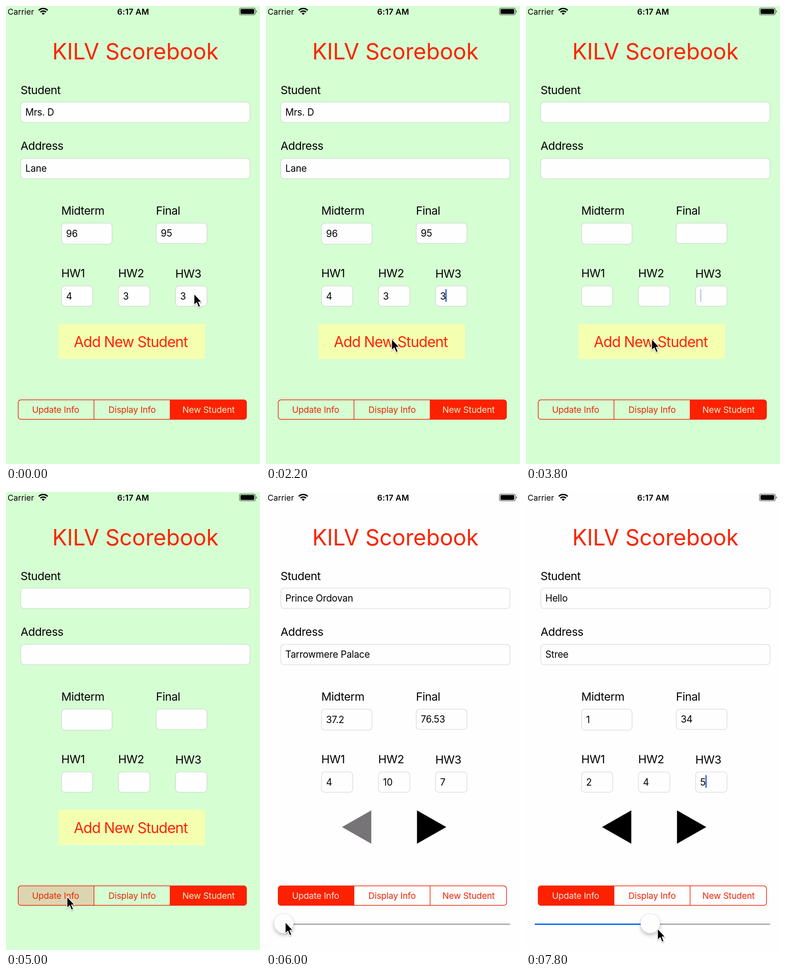
Recreate the animation shown at these times as an HTML page. Size 558 px wide and 1003 px high, loop 8000 ms.

```html
<!DOCTYPE html>
<html lang="en">
<head>
<meta charset="utf-8">
<title>Student form</title>
<style>
  html, body { margin: 0; width: 100%; height: 100%; overflow: hidden; }
  svg { display: block; width: 558px; height: 1003px; }
  text { font-family: Inter, "Liberation Sans", sans-serif; font-optical-sizing: none; }
  .mid { text-anchor: middle; }
  .status { font-size: 17.8px; }
  .label { font-size: 24.9px; letter-spacing: -.02em; }
  .value { font-size: 20.8px; letter-spacing: -.012em; }
  .seg { font-size: 19.2px; letter-spacing: -.01em; }
  .box { fill: #fefefe; stroke: currentColor; stroke-width: 1.1; }
</style>
</head>
<body>
<svg id="stage" viewBox="0 0 558 1003">
  <defs>
    <clipPath id="pill"><rect x="26.5" y="862.5" width="502" height="43" rx="6"/></clipPath>
    <filter id="soft" x="-50%" y="-50%" width="200%" height="200%">
      <feDropShadow dx="0" dy="4" stdDeviation="4" flood-opacity=".25"/>
    </filter>
    <filter id="drop" x="-50%" y="-50%" width="200%" height="200%">
      <feDropShadow dx="0" dy="1.5" stdDeviation="1.2" flood-opacity=".35"/>
    </filter>
  </defs>
  <rect id="back" width="558" height="1003"/>

  <text class="status" x="3.5" y="18.5">Carrier</text>
  <g fill="none" stroke="#000" stroke-width="3">
    <path d="M72 9.6A14 14 0 0 1 91.6 9.6"/>
    <path d="M75.6 13.4A9 9 0 0 1 88 13.4"/>
    <path d="M81.8 19.5L78.5 16.2A4.7 4.7 0 0 1 85.1 16.2Z" fill="#000" stroke="none"/>
  </g>
  <text class="status mid" x="279.3" y="18.5" font-weight="600" letter-spacing=".2">6:17 AM</text>
  <rect x="513" y="4.5" width="34.5" height="15" rx="3.5" fill="none" stroke="#444" stroke-width="1.2"/>
  <rect x="515.2" y="6.5" width="30" height="11" rx="1.8"/>
  <path d="M549.3 9.5q2 .5 2 2.5t-2 2.5z" fill="#555"/>

  <text class="mid" x="284" y="116.5" font-size="49" letter-spacing="-.25" fill="#f92606">KILV Scorebook</text>
  <g id="form"></g>
  <rect id="caret" y="620" width="3" height="28" rx="1" fill="#466ad6"/>

  <g id="add">
    <rect x="115.5" y="696" width="321.5" height="77" fill="#f5ffb0"/>
    <text x="149" y="746.5" font-size="32" letter-spacing="-1" fill="#f92606">Add New Student</text>
  </g>
  <g id="browse">
    <path id="prev" d="M167 733.7L231.3 697.2V770.2Z"/>
    <path d="M396 733.7L331.7 697.2V770.2Z"/>
    <rect x="19" y="945" width="517.5" height="3" rx="1.5" fill="#adacae"/>
    <rect id="fill" x="19" y="945" height="3" rx="1.5" fill="#0b6cf5"/>
    <circle id="knob" cy="945" r="21.3" fill="#fefefe" stroke="#000" stroke-opacity=".08" filter="url(#soft)"/>
  </g>

  <g id="segments" clip-path="url(#pill)"></g>
  <g fill="none" stroke="#ee2c10" stroke-width="1.5">
    <rect x="26.8" y="862.6" width="501.6" height="42.7" rx="6"/>
    <path d="M193.3 863v42M360.5 863v42"/>
  </g>
  <path id="cursor" d="M0 0V25L5.800 19.800L9.800 29.500L14 27.700L10 18.200H17Z"
        stroke="#fff" stroke-width="1.5" stroke-linejoin="round" filter="url(#drop)"/>
</svg>
<script>
const $ = id => document.getElementById(id);
const RED = '#fc2100', GREEN = '#d5ffd2', WHITE = '#fefefe';

function add(parent, tag, attrs, text = '') {
  const el = document.createElementNS('http://www.w3.org/2000/svg', tag);
  for (const k in attrs) el.setAttribute(k, attrs[k]);
  el.textContent = text;
  return parent.appendChild(el);
}
const set = (id, attrs) => { for (const k in attrs) $(id).setAttribute(k, attrs[k]); };

// label, x, label baseline, box top, box width, box height
const fields = [
  ['Student', 32.5, 193, 210.5, 503.5, 44.5],
  ['Address', 32.5, 314.5, 333.7, 503.5, 44.5],
  ['Midterm', 122, 456.5, 475.5, 111, 46],
  ['Final', 330, 456.5, 475.5, 111.5, 44.5],
  ['HW1', 122, 594, 613, 68.5, 44.5],
  ['HW2', 247, 594, 613, 69, 44.5],
  ['HW3', 372.5, 595, 613, 69, 44.5],
].map(([name, x, base, y, width, height]) => {
  add($('form'), 'text', { class: 'label', x: x - .5, y: base }, name);
  add($('form'), 'rect', { class: 'box', x, y, width, height, rx: 7 });
  return add($('form'), 'text', { class: 'value', x: x + 10, y: y + height / 2 + 7.4 });
});

const segments = ['Update Info', 'Display Info', 'New Student'].map((name, i) => ({
  rect: add($('segments'), 'rect', { x: 26 + i * 167.2, y: 862, width: 168, height: 44 }),
  text: add($('segments'), 'text', { class: 'seg mid', x: 109 + i * 168, y: 891 }, name),
}));

const records = {
  typed: ['Mrs. D', 'Lane', '96', '95', '4', '3', '3'],
  empty: Array(7).fill(''),
  first: ['Prince Ordovan', 'Tarrowmere Palace', '37.2', '76.53', '4', '10', '7'],
  second: ['Hello', 'Stree', '1', '34', '2', '4', '5'],
};

const clamp = v => Math.min(1, Math.max(0, v));
const ease = v => v * v * (3 - 2 * v);

// start, end, x, y, linear
const moves = [
  [600, 1800, 276, 729],
  [3800, 4800, 134, 886],
  [5400, 6100, 37, 945],
  [6200, 6800, 126, 947, true],
  [6800, 7800, 289, 956, true],
];
function pointer(t) {
  let x = 413, y = 630;
  for (const [a, b, toX, toY, linear] of moves) {
    const p = clamp((t - a) / (b - a)), k = linear ? p : ease(p);
    x += (toX - x) * k;
    y += (toY - y) * k;
  }
  return [x, y];
}

const CLEAR = 2900, SWITCH = 5100;

function draw(t) {
  const update = t > SWITCH;
  const knob = 39 + 89 * clamp((t - 6200) / 600) + 145 * clamp((t - 6800) / 1000);
  const index = Math.round((knob - 39) / 477 * 3);
  const record = update ? (index ? 'second' : 'first') : t > CLEAR ? 'empty' : 'typed';

  set('back', { fill: update ? WHITE : GREEN });
  set('form', { color: update ? '#d2d2da' : '#c5d2c7' });
  fields.forEach((el, i) => el.textContent = records[record][i]);
  set('add', { display: update ? 'none' : 'inline' });
  set('browse', { display: update ? 'inline' : 'none' });
  set('prev', { fill: index ? '#000' : '#767476' });
  set('fill', { width: knob - 19 });
  set('knob', { cx: knob });

  // the blink restarts when the record changes
  const phase = index ? (t - 6590) % 1000 : t % 1000;
  const on = clamp((phase - 50) / 100) * clamp((850 - phase) / 150);
  set('caret', { x: record === 'empty' ? 382.5 : 394, opacity: on });

  const chosen = update ? 0 : 2;
  segments.forEach(({ rect, text }, i) => {
    rect.setAttribute('fill', i === chosen ? RED : 'none');
    text.setAttribute('fill', i !== chosen ? '#ee2608' : update ? '#ffe9e2' : '#e2f3c8');
  });
  if (t >= 5000 && !update) segments[0].rect.setAttribute('fill', '#dcd6b0');
  if (update && t < 5400) segments[2].rect.setAttribute('fill', '#f9eeec');

  set('cursor', { transform: `translate(${pointer(t)})` });
}

const start = performance.now();
function tick() {
  const t = (performance.now() - start) % 8000;
  draw(Math.floor(t / 200) * 200);
  requestAnimationFrame(tick);
}
tick();
</script>
</body>
</html>
```
